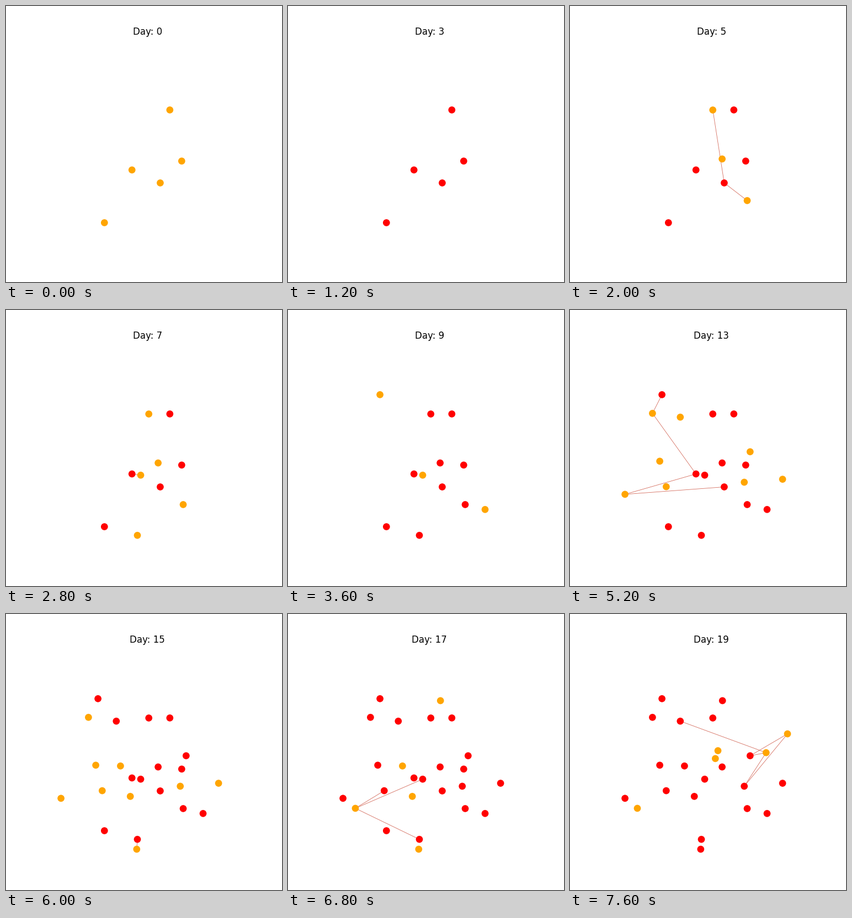
Recreate the animation shown at these times as a matplotlib script. Size 500 by 500 pixels, loop 8000 ms.

```python
import matplotlib.pyplot as plt
from matplotlib.animation import FuncAnimation
from matplotlib.collections import LineCollection

DAYS = 20
INCUBATION = 4
REMOVAL_DAY = 19
EDGE_COLOR = (0.83, 0.42, 0.36)

# name: (x, y, day infected, names of the infectious contacts)
PEOPLE = {
    "A": (296.8, 188.3, -1, ""),
    "B": (318.3, 280.9, -1, ""),
    "C": (228.2, 297.0, -1, ""),
    "D": (279.4, 320.5, -1, ""),
    "E": (178.3, 392.6, -1, ""),
    "G": (275.6, 277.1, 4, "ACD"),
    "F": (258.7, 188.4, 5, "D"),
    "H": (321.0, 352.5, 5, "D"),
    "K": (238.0, 408.2, 6, "E"),
    "M": (244.0, 299.2, 7, "C"),
    "I": (166.6, 153.4, 8, "F"),
    "J": (357.0, 361.4, 8, "H"),
    "L": (326.3, 256.8, 10, "D"),
    "N": (199.8, 194.1, 11, "A"),
    "O": (162.6, 273.9, 12, "C"),
    "P": (174.3, 320.1, 12, "C"),
    "Q": (315.7, 312.0, 12, "D"),
    "R": (385.1, 306.6, 12, "J"),
    "S": (149.4, 187.2, 13, "IC"),
    "T": (99.6, 333.9, 13, "CD"),
    "U": (207.4, 275.3, 14, "L"),
    "V": (225.2, 330.4, 14, "E"),
    "W": (236.8, 426.1, 15, "K"),
    "X": (276.2, 157.0, 16, "A"),
    "Y": (122.0, 352.0, 17, "PMK"),
    "Z": (268.0, 247.6, 18, "L"),
    "a": (263.3, 261.9, 18, "G"),
    "b": (394.0, 217.1, 18.5, "LQ"),
    "c": (355.3, 251.2, 18.5, "NLQ"),
}
FAST = "KX"  # shorter incubation

fig = plt.figure(figsize=(5, 5), dpi=100, facecolor="white")
ax = fig.add_axes([0, 0, 1, 1])
ax.set(xlim=(0, 500), ylim=(500, 0))
ax.axis("off")

edges = LineCollection([], colors=[EDGE_COLOR], linewidths=0.6, zorder=1)
ax.add_collection(edges)
nodes = ax.scatter([], [], s=(12.7 * 0.72) ** 2, linewidths=0, zorder=2)
title = ax.text(256.25, 51.7, "", fontsize=12, family="DejaVu Sans",
                ha="center", va="baseline", color="black")


def position(name):
    return PEOPLE[name][:2]


def update(day):
    points, colors, links = [], [], []
    for name, (x, y, start, contacts) in PEOPLE.items():
        removed = start < 0 and day >= REMOVAL_DAY
        if day < start or removed:
            continue
        incubation = INCUBATION - (name in FAST)
        points.append((x, y))
        colors.append("red" if day - start >= incubation else "orange")
        if day - start < 1:
            links += [[(x, y), position(c)] for c in contacts]
    nodes.set_offsets(points)
    nodes.set_facecolors(colors)
    edges.set_segments(links)
    title.set_text(f"Day: {day}")
    return nodes, edges, title


anim = FuncAnimation(fig, update, frames=DAYS, interval=400,
                     repeat=True, repeat_delay=0)
plt.show()
```
